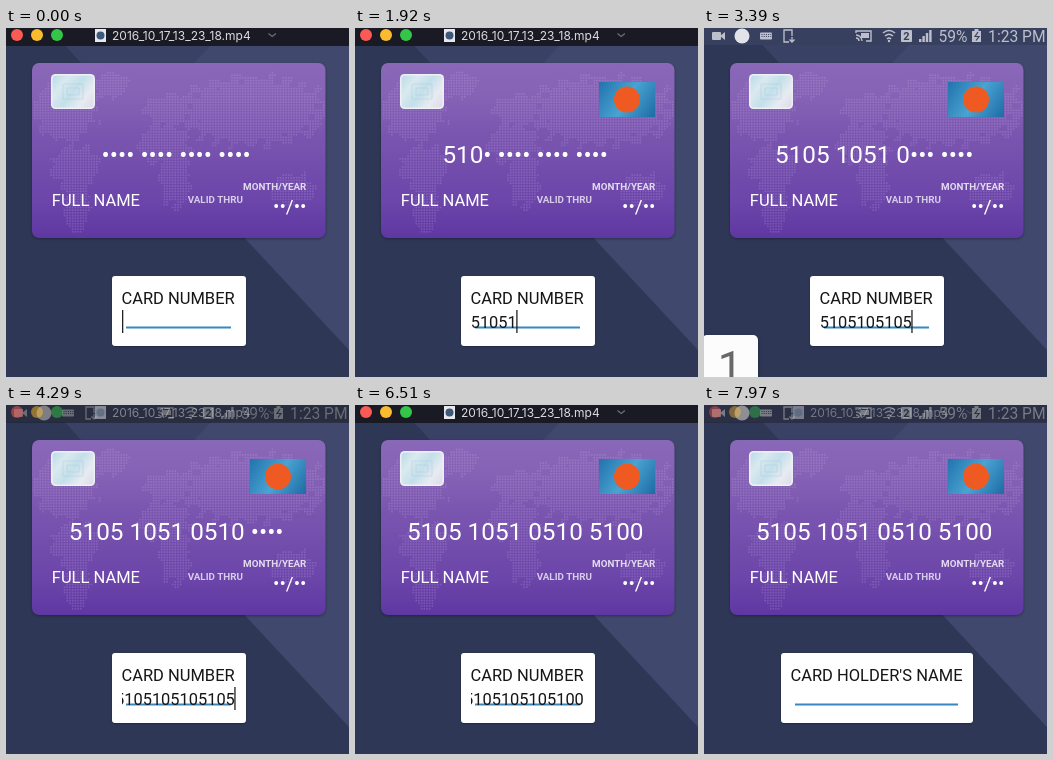
These frames come from a looping animation (343x349 px, 8 s). An HTML page with a canvas:

```html
<!DOCTYPE html>
<html lang="en">
<head>
<meta charset="utf-8">
<title>Card form</title>
<style>
  html, body { margin: 0; width: 100%; height: 100%; overflow: hidden; background: #2e3856; }
  canvas { display: block; }
</style>
</head>
<body>
<canvas id="stage" width="343" height="349"></canvas>
<script>
const W = 343, H = 349, LOOP = 8000, STEP = 147.3;
const ctx = document.getElementById('stage').getContext('2d');
const NUMBER = '5105105105105100';

const clamp = v => Math.max(0, Math.min(1, v));
const smooth = v => v * v * (3 - 2 * v);

// Linear interpolation through [step, value] key points
function track(n, ...points) {
  return points.reduce((value, [at, target], i) => {
    const [from, start] = points[Math.max(0, i - 1)];
    return n < from ? value : start + (target - start) * clamp((n - from) / (at - from || 1));
  }, points[0][1]);
}

const whole = v => Math.floor(v + 1e-6);
const typedCount = n => whole(track(n, [4, 0.5], [11, 4], [17, 8], [24, 11], [33, 15], [37, 16]));
const shownCount = n => whole(track(n, [7, 0.4], [11, 2], [17, 5], [23, 9], [28, 12], [35, 12], [41, 16]));
const statusAlpha = n => track(n, [16.6, 0], [19, 1], [27.5, 1], [30.5, 0], [52.6, 0], [55, 1]);

function text(c, str, x, y, size, color = '#fff', weight = 400, align = 'left', family = 'Roboto') {
  c.font = `${weight} ${size}px ${family}, sans-serif`;
  c.textAlign = align;
  c.fillStyle = color;
  c.fillText(str, x, y);
}

function rect(c, x, y, w, h, color) {
  c.fillStyle = color;
  c.fillRect(x, y, w, h);
}

function rounded(c, x, y, w, h, r, fill, shadow = 0) {
  c.save();
  c.shadowColor = 'rgba(0,0,0,.35)';
  c.shadowBlur = shadow;
  c.shadowOffsetY = shadow / 3;
  c.beginPath();
  c.roundRect(x, y, w, h, r);
  c.fillStyle = fill;
  c.fill();
  c.restore();
}

function disc(c, x, y, r, color) {
  c.beginPath();
  c.arc(x, y, r, 0, Math.PI * 2);
  c.fillStyle = color;
  c.fill();
}

function gradient(c, x0, y0, x1, y1, colors) {
  const g = c.createLinearGradient(x0, y0, x1, y1);
  colors.forEach((color, i) => g.addColorStop(i / (colors.length - 1), color));
  return g;
}

function fillPath(c, d, color) {
  c.fillStyle = color;
  c.fill(new Path2D(d));
}

function strokePath(c, d, color, width = 1) {
  c.strokeStyle = color;
  c.lineWidth = width;
  c.stroke(new Path2D(d));
}

// Dotted continents: a few ellipses with a wavy coastline
function drawMap(c) {
  const lands = [
    [58, 82, 32, 30], [104, 56, 18, 13], [68, 138, 25, 22], [70, 176, 13, 30],
    [158, 116, 26, 20], [168, 150, 15, 28], [162, 82, 24, 16], [246, 82, 74, 34], [285, 160, 22, 16]
  ];
  for (let y = 41; y < 207; y += 2.7) {
    for (let x = 28; x < 318; x += 2.7) {
      const coast = 1 + 0.25 * Math.sin(x * 0.35 + y * 0.2) + 0.2 * Math.sin(y * 0.5 - x * 0.15);
      const isLand = lands.some(([cx, cy, rx, ry]) => ((x - cx) / rx) ** 2 + ((y - cy) / ry) ** 2 < coast);
      if (isLand) rect(c, x, y, 1.6, 1.6, 'rgba(220,195,245,.2)');
    }
  }
}

function drawChip(c) {
  rounded(c, 45, 46, 44, 35, 4.5, '#edf1f6');
  rounded(c, 46.5, 47.5, 41, 32, 3.5,
    gradient(c, 46, 48, 88, 80, ['#b9dbe8', '#dae9ef', '#c4dfea', '#e8ebf1', '#dbdae9']));
  strokePath(c, 'M57 56h20v15h-20z M61 60h12v7h-12z', 'rgba(150,195,215,.35)');
}

function buildScene() {
  const canvas = document.createElement('canvas');
  canvas.width = W;
  canvas.height = H;
  const c = canvas.getContext('2d');
  rect(c, 0, 0, W, H, '#2e3856');
  fillPath(c, 'M43 0H343V322Z', '#40486d');
  fillPath(c, 'M43 0H221L132 95Z', '#394164');
  rounded(c, 26, 35, 293.5, 175, 7,
    gradient(c, 0, 35, 0, 210, ['#8a68b8', '#8562b5', '#7b56b0', '#724dac', '#6b45a9', '#5f37a2']), 3);
  drawMap(c);
  drawChip(c);
  text(c, 'FULL NAME', 45.8, 178, 16.5);
  text(c, 'MONTH/YEAR', 300.3, 162, 9.8, '#e3daf0', 700, 'right');
  text(c, 'VALID THRU', 237, 175, 9.8, '#d8cdea', 700, 'right');
  text(c, '••/••', 300.5, 184.6, 19, '#fff', 400, 'right');
  return canvas;
}

function drawNumber(count) {
  const str = NUMBER.slice(0, count).padEnd(16, '•').replace(/(.{4})(?=.)/g, '$1 ');
  text(ctx, str, 170.2, 135, 24.3, '#fff', 400, 'center');
}

function drawBrand(alpha) {
  ctx.globalAlpha = alpha;
  rect(ctx, 244, 54, 56, 35, gradient(ctx, 244, 54, 300, 89, ['#2173ad', '#4aa3d1', '#1d6ba5']));
  disc(ctx, 272, 71.5, 13, '#ee5a22');
  ctx.globalAlpha = 1;
}

function drawField(x, w, label, value, cursor) {
  if (x > W || x + w < 0) return;
  rounded(ctx, x, 248, w, 70, 3, '#fff', 2);
  text(ctx, label, x + 9.4, 276, 16.5, '#161616');
  rect(ctx, x + 14, 298.5, w - 29, 2, '#3787c0');
  ctx.save();
  ctx.beginPath();
  ctx.rect(x + 10, 280, w - 20, 30);
  ctx.clip();
  ctx.font = '400 16.4px Roboto, sans-serif';
  const width = ctx.measureText(value).width;
  const start = Math.min(x + 9.7, x + w - 11.2 - width);
  text(ctx, value, start, 300.2, 16.4, '#161616');
  if (cursor) rect(ctx, Math.max(x + 10, start + width - 0.5), 282, 1.3, 23, '#222');
  ctx.restore();
}

function drawPopup(digit) {
  const x = 128 + (digit - 5) * 32.5;
  rounded(ctx, x, 307, 56, 60, 5, '#fcfcfc', 5);
  text(ctx, digit, x + 28, 355, 44, '#686868', 400, 'center');
}

function drawTitleBar(alpha) {
  ctx.globalAlpha = alpha;
  rect(ctx, 0, 0, W, 18, '#191a23');
  ['#fc5b55', '#fbbb2f', '#34c648'].forEach((color, i) => disc(ctx, 11 + i * 20, 7, 6, color));
  rect(ctx, 89, 1, 11, 13, '#e6e8ee');
  disc(ctx, 94.5, 7.5, 4, '#3d5878');
  text(ctx, '2016_10_17_13_23_18.mp4', 106, 11.5, 12, '#dcdce0', 400, 'left', 'Inter');
  strokePath(ctx, 'M262.5 5.5l3.7 3 3.7 -3', '#6c6d76', 1.3);
  ctx.globalAlpha = 1;
}

function drawStatusBar() {
  const ink = '#bdc0cb', dark = '#38405f';
  rect(ctx, 0, 0, W, 17, dark);
  // camera and app badge
  rounded(ctx, 8, 4, 9, 8, 1, ink);
  fillPath(ctx, 'M16 8l5 -4v8z', ink);
  disc(ctx, 38, 8, 7.5, '#e2e3e8');
  // keyboard
  rounded(ctx, 56, 4.5, 12, 7, 1, ink);
  for (let x = 57.5; x < 67; x += 2.2) {
    rect(ctx, x, 6, 1, 1, dark);
    rect(ctx, x, 8, 1, 1, dark);
  }
  // phone
  strokePath(ctx, 'M88 8V2h-8v12h5 M88 9v5 M85.5 11.5l2.5 2.5 2.5 -2.5', ink, 1.3);
  // cast
  strokePath(ctx, 'M152 5V3h15v10h-5 M152 7a6 6 0 0 1 6 6 M152 10a3 3 0 0 1 3 3', ink, 1.4);
  rect(ctx, 157, 5, 8, 5, ink);
  // wifi
  strokePath(ctx, 'M179 5q6 -5 12 0 M181 8q4 -3.5 8 0 M183 11q2 -2 4 0', ink, 1.6);
  disc(ctx, 185, 13, 1.2, ink);
  // signal
  rounded(ctx, 197, 2, 11, 12, 1, ink);
  text(ctx, '2', 202.5, 12, 11, dark, 700, 'center');
  for (let i = 0; i < 4; i++) rect(ctx, 215 + i * 3.4, 11 - i * 3, 2.4, 3 + i * 3, ink);
  text(ctx, '59%', 234.5, 13.5, 15.6, ink);
  // battery
  rect(ctx, 270.5, 1, 4, 2, ink);
  rect(ctx, 268, 3, 9, 11, ink);
  strokePath(ctx, 'M274 4l-3 4.5h4l-3 4', dark, 1.2);
  text(ctx, '1:23 PM', 341.5, 13.5, 15.6, ink, 400, 'right');
}

const scene = buildScene();

function draw(time) {
  const n = Math.floor(time / STEP);
  ctx.drawImage(scene, 0, 0);
  drawNumber(shownCount(n));
  drawBrand(clamp((n - 11) / 2));

  const typed = typedCount(n);
  const slide = W * smooth(clamp((n - 44) / 3));
  drawField(106 - slide, 134, 'CARD NUMBER', NUMBER.slice(0, typed), n < 2 || (n > 4 && n < 44));
  drawField(77 + W - slide, 192, "CARD HOLDER'S NAME", '', n === 49 || n === 50);

  // The key preview appears just before its digit is typed
  const digit = NUMBER[typed];
  if (digit > 0 && typedCount(n + 1) > typed) drawPopup(digit);

  const status = statusAlpha(n);
  if (status > 0) drawStatusBar();
  drawTitleBar(1 - status);
}

const begin = performance.now();
function frame() {
  draw((performance.now() - begin) % LOOP);
  requestAnimationFrame(frame);
}
frame();
</script>
</body>
</html>
```
